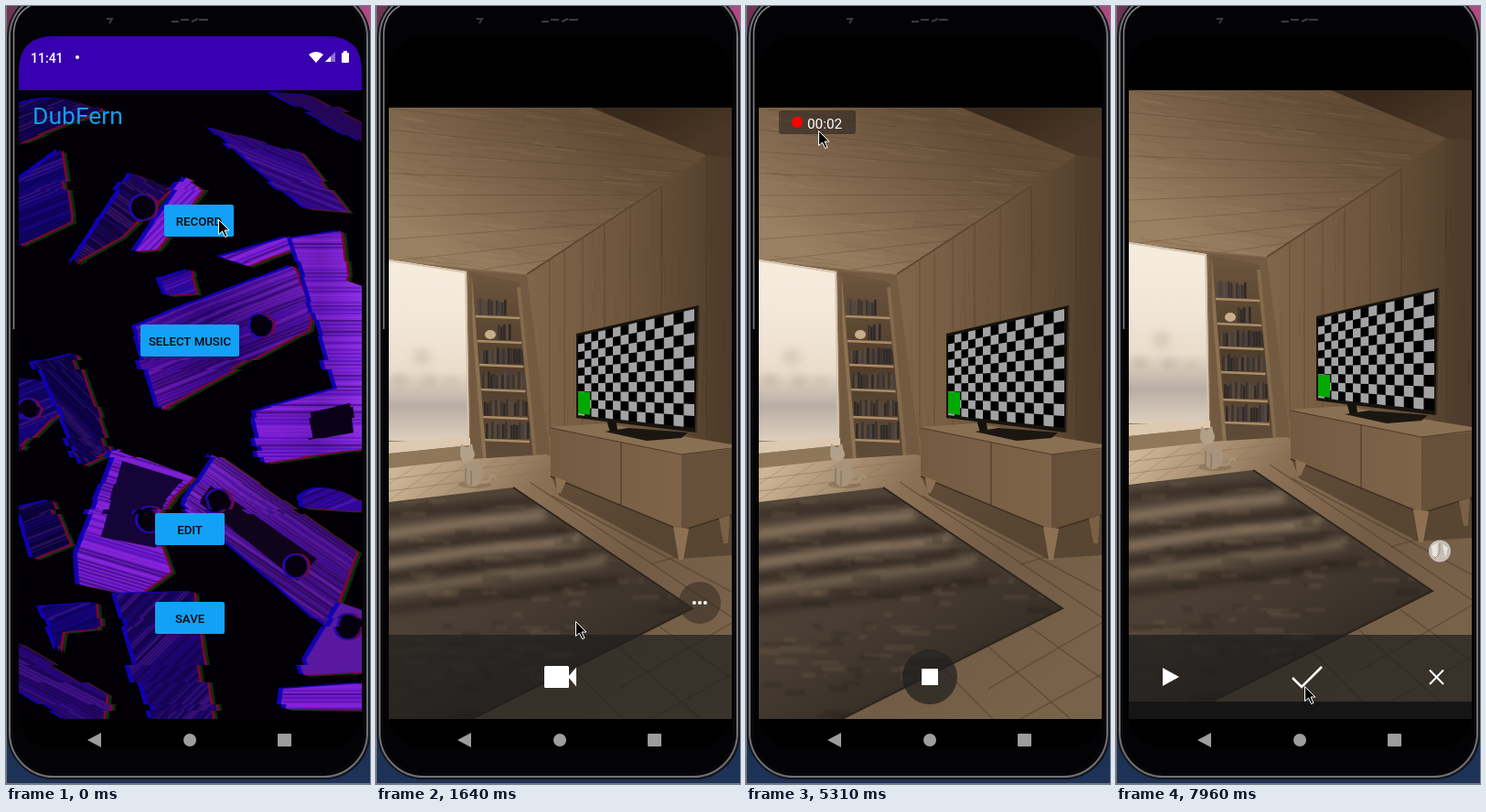
These frames come from a looping animation (398x850 px, 8000 ms). An HTML page with a canvas:

```html
<!DOCTYPE html>
<html lang="en">
<head>
<meta charset="utf-8">
<style>
html, body { margin: 0; width: 100%; height: 100%; overflow: hidden; background: #000; }
canvas { display: block; }
</style>
</head>
<body>
<canvas id="stage" width="398" height="850"></canvas>
<script>
const W = 398, H = 850, LOOP = 8000, TICK = 136;
const stage = document.getElementById('stage').getContext('2d');
let g = stage;

let seed = 7;
const rand = () => (seed = seed * 16807 % 2147483647) / 2147483647;
const lerp = (a, b, k) => a + (b - a) * k;
const clamp = (v, lo = 0, hi = 1) => Math.min(hi, Math.max(lo, v));

function fill(path, color) { g.fillStyle = color; g.fill(new Path2D(path)); }
function stroke(path, color, width = 1) {
  g.strokeStyle = color; g.lineWidth = width; g.stroke(new Path2D(path));
}
function box(x, y, w, h, color, r = 0) {
  g.fillStyle = color; g.beginPath(); g.roundRect(x, y, w, h, r); g.fill();
}
function oval(x, y, rx, color, ry = rx) {
  g.fillStyle = color; g.beginPath(); g.ellipse(x, y, rx, ry, 0, 0, 7); g.fill();
}
function text(s, x, y, size, color, weight = 400, align = 'left') {
  g.font = `${weight} ${size}px Roboto, sans-serif`;
  g.textAlign = align; g.fillStyle = color; g.fillText(s, x, y);
}
function gradient(x0, y0, x1, y1, ...colors) {
  const gr = g.createLinearGradient(x0, y0, x1, y1);
  colors.forEach((c, i) => gr.addColorStop(i / (colors.length - 1), c));
  return gr;
}
function clipped(path, draw) { g.save(); g.clip(new Path2D(path)); draw(); g.restore(); }
function layer(draw) {
  const c = document.createElement('canvas');
  c.width = W; c.height = H;
  const outer = g;
  g = c.getContext('2d'); draw(); g = outer;
  return c;
}

const phone = layer(() => {
  box(0, 0, W, 400, gradient(0, 0, W, 0, '#6e3555', '#4a2748', '#b34a83'));
  box(0, 400, W, 450, gradient(0, 400, 0, H, '#241a34', '#1d3358'));
  box(0, 0, 1, H, '#77787d'); box(0, H - 1, W, 1, '#77787d');
  box(2, -16, 396, 861, '#030305', 50);
  const rim = (inset, color, width) => {
    g.beginPath(); g.roundRect(2 + inset, -16 + inset, 395 - 2 * inset, 860 - 2 * inset, 50 - inset);
    g.strokeStyle = color; g.lineWidth = width; g.stroke();
  };
  rim(0, '#18191c', 2); rim(2, '#717378', 2); rim(5, '#08080b', 2);
  stroke('M8.5 353V28Q10 8 26 0', '#85878c', 1.5);
  box(14, 33, 375, 778, '#000', 38);
  stroke('M110 14h6l-3 5M181 17h8M191 15h9M203 17l7-3M211 15h10', '#3b3b3f', 2);
});

// One cassette body: colour fringes, shaded face, then fine stripes along its edge.
function cassette(path, color, slope = -0.4) {
  for (const [dx, dy, fringe] of [[-5, -1, '#1000b4'], [6, 2, '#06300c'], [3, 1, '#7c0630']]) {
    g.save(); g.translate(dx, dy); fill(path, fringe); g.restore();
  }
  fill(path, color);
  clipped(path, () => {
    for (let y = 0; y < 1000; y += 4)
      stroke(`M0 ${y}L398 ${y + 398 * slope}`, ['#0e004070', '#2a04a060', '#b040ff30'][rand() * 3 | 0], 1 + rand() * 2);
  });
}
// Shifts a few horizontal bands of what is drawn so far sideways.
function glitch() {
  for (let y = 110; y < 770; y += 14 + rand() * 40) {
    const h = 4 + rand() * 16, shift = rand() * 18 - 9;
    g.drawImage(g.canvas, 14, y, 375, h, 14 + shift, y, 375, h);
  }
}
const BUTTONS = [['RECORD', 173, 217, 76], ['SELECT MUSIC', 147, 348, 108], ['EDIT', 163, 554, 76], ['SAVE', 163, 651, 76]];

const home = layer(() => clipped('M14 71Q14 33 52 33H351Q389 33 389 71V779H14Z', () => {
  box(14, 33, 375, 746, '#020006');
  const dim = '#100468', mid = '#32089a', hot = '#7a1ed0';
  g.filter = 'blur(.7px)';
  cassette('M14 190L60 157 72 235 14 262Z', dim);
  cassette('M14 108Q55 92 96 112L90 120 14 150Z', '#0a033c');
  cassette('M72 282L138 183 182 198 126 252Z', '#14063c', .7);
  cassette('M290 95L330 97 389 128V148Z', '#240658', .4);
  cassette('M228 133L322 160 374 225 328 221 268 172Z', '#320a80', .4);
  cassette('M197 187L216 199 165 266 141 268Z', hot, -1);
  cassette('M235 274L310 252 312 266 262 284Z', hot);
  cassette('M168 298L200 288 208 314 176 316Z', mid);
  cassette('M140 350L312 284 334 330 328 354 168 441Z', gradient(140, 430, 330, 290, '#6214a8', '#34087a', '#6a1cb4'));
  cassette('M312 254L366 246 372 300 389 306V484L283 499 270 443 362 418 330 310Z', gradient(300, 0, 389, 0, hot, '#6a1ab8', '#8a2ce0'), 0);
  fill('M330 444L376 434 380 466 336 474Z', '#0a0018');
  cassette('M14 407L44 410 60 440 14 486Z', dim);
  cassette('M36 390L76 380 114 488 84 502Z', '#0b0340', 1);
  cassette('M122 484L205 515 176 545 168 585 180 618 142 645 80 632 78 598 108 522Z', hot, .3);
  fill('M127 497L194 518 172 545 164 592 104 580Z', '#150438');
  cassette('M231 490L383 596 352 681 195 545Z', gradient(200, 500, 370, 680, '#7a24c4', '#4c1488', '#4a1284'), .68);
  fill('M226 524L340 604 318 628 212 543Z', '#10041c');
  cassette('M325 536Q350 515 389 542V552L325 548Z', mid);
  cassette('M14 548L50 540 70 588 30 604Z', '#0a0338');
  cassette('M328 714L366 652 389 660V728L334 731Z', '#5a18a0', -1);
  cassette('M38 656L98 652 100 680 62 684 58 706Z', dim);
  cassette('M14 696L110 752 106 779H64L14 748Z', '#260868', .5);
  cassette('M120 642L205 640 226 779H160Z', '#1a065a', -1);
  cassette('M303 746L389 740V769L300 768Z', hot, 0);
  for (const [x, y, r] of [[277, 349, 14], [157, 561, 15], [234, 541, 14], [317, 612, 14], [150, 220, 15], [374, 678, 15], [24, 440, 12]]) {
    oval(x + 2, y, r, '#70083a'); oval(x - 1, y, r, '#2408a8'); oval(x, y, r - 2, '#05000d');
  }
  g.filter = 'none';
  glitch();

  box(14, 33, 375, 59, '#3900b1');
  text('11:41', 27, 62, 14, '#fff', 500);
  oval(78, 56, 2, '#fff');
  fill('M331 53Q339 47 347 53L339 62Z', '#fff');
  fill('M349 61L360 50V61Z', '#8f70d4'); fill('M349 61L355 55V61Z', '#fff');
  box(367, 51, 8, 11, '#fff', 1); box(369, 49, 4, 3, '#fff');
  text('DubFern', 29, 129, 26.5, '#189bea');
  for (const [label, x, y, w] of BUTTONS) {
    box(x, y + 1, w, 35, '#0006', 2);
    box(x, y, w, 35, '#12a1f6', 2);
    text(label, x + w / 2, y + 22.5, 13.2, '#05080c', 500, 'center');
  }
}));

function television() {
  fill('M252 452L262 450 264 463 256 466Z', '#15120e');
  fill('M250 465L276 461 341 466 334 472 296 475Z', '#1b1611');
  fill('M219 358L353 327 350 466 219 450Z', '#17130e');
  stroke('M353 328L350 466', '#3c3022', 2);
  const spot = (u, v) => {
    const k = u / (u + (1 - u) * 1.3);
    return [lerp(221, 348, k), lerp(lerp(361, 331, k), lerp(447, 461, k), v)];
  };
  const patch = (u, v, du, dv, color) =>
    fill('M' + [spot(u, v), spot(u + du, v), spot(u + du, v + dv), spot(u, v + dv)].join('L') + 'Z', color);
  patch(0, 0, 1, 1, '#020202');
  for (let c = 0; c < 14; c++)
    for (let r = (c + 1) % 2; r < 10; r += 2) patch(c / 14, r / 10, 1 / 14, .1, '#a3a3a5');
  fill('M221 422H234V447L221 445Z', '#00a800');
}

function shelf() {
  fill('M101 289L165 294 190 490 104 499Z', '#735b42');
  fill('M103 291L157 302 175 493 118 497Z', gradient(0, 292, 0, 495, '#6d553d', '#503e2c', '#5f4b37'));
  [340, 367, 393, 420, 450, 475].forEach((y, i) => {
    const left = 109 + i * 2, right = 157 + i * 2.2;
    for (let x = left + 1; x < right - 14 * (i < 2); x += 3) {
      if (i === 1 && x < 132) continue;
      const h = 14 + rand() * 5;
      box(x, y - 2 - h, 2.6, h, ['#3c3430', '#2f2a28', '#57483c', '#484040'][rand() * 4 | 0]);
    }
    stroke(`M${left} ${y - 1}L${right} ${y + 1}`, '#a98c68', 2.5);
  });
  oval(125, 359, 6, '#c5ad8e', 5);
  stroke('M103 296L119 497', '#8c7151', 4);
  stroke('M156 307L174 495', '#846a4b', 4);
}

function rug() {
  const shape = 'M14 542L150 526 346 658 105 779H14Z';
  fill(shape, gradient(60, 530, 190, 760, '#54473a', '#4a3f34', '#352d26'));
  clipped(shape, () => {
    g.filter = 'blur(4px)';
    stroke('M10 578L90 566 185 556M10 610L110 594 225 584', '#a58f74a0', 11);
    stroke('M10 640L120 624 250 606', '#8f7a62a0', 9);
    stroke('M10 556L175 540M10 594L210 571M10 625L230 598M10 660L270 626', '#2a221bb0', 9);
    g.filter = 'blur(1px)';
    for (let i = 0; i < 150; i++) {
      const y = 535 + rand() * 240;
      box(14 + rand() * 320, y, 8 + rand() * 26, 3 + rand() * 5, rand() < .5 ? '#1c161230' : '#9a836624');
    }
    g.filter = 'none';
  });
  stroke('M150 526L346 658 105 779', '#2b241e', 2);
}

const room = layer(() => clipped('M14 111H389V779H14Z', () => {
  box(14, 111, 375, 668, gradient(165, 0, 389, 0, '#80664a', '#6d553d', '#4f3c2a'));
  for (const [x, y] of [[190, 276], [206, 266], [226, 253], [250, 238], [278, 220], [312, 197], [361, 163]])
    stroke(`M${x} ${y}V470`, '#4c392770', x > 300 ? 1.5 : 1);
  for (let i = 0; i < 90; i++) {
    const y = 210 + rand() * 260;
    box(165 + rand() * 224, y, 1, 20 + rand() * 50, '#3b2a1c14');
  }
  const ceiling = 'M14 111H235L361 163 312 197 165 293 14 278Z';
  fill(ceiling, gradient(210, 111, 90, 285, '#624c36', '#7c634a', '#9a8163'));
  clipped(ceiling, () => {
    for (let i = -4; i < 9; i++) stroke(`M14 ${111 + i * 24}L350 ${158 + i * 12}`, '#49372548');
    for (let i = 0; i < 110; i++) {
      const x = 14 + rand() * 290, y = 111 + rand() * 180;
      stroke(`M${x} ${y}l${20 + rand() * 40} 5`, rand() < .5 ? '#4a372414' : '#c0a37f16', 2);
    }
  });
  fill('M235 111H389V166L361 163Z', gradient(300, 111, 330, 163, '#38291c', '#493624'));
  fill('M361 163L389 150V480H361Z', '#49372540');
  stroke('M165 293L312 197', '#5a442f', 1.5);

  shelf();
  fill('M14 277L99 290 102 475H14Z', gradient(0, 285, 0, 475, '#f5ecde', '#f4e9da', '#f0e4d4', '#e9dccb', '#b9aea4', '#dccfbe'));
  g.filter = 'blur(4px)';
  oval(50, 384, 10, '#d9ccbb'); oval(26, 410, 10, '#cbbdac', 7); oval(58, 411, 9, '#cbbdac', 7); oval(82, 413, 9, '#cfc1b0', 6);
  g.filter = 'none';
  stroke('M14 278L98 291 101 475', '#d6c5ae', 2);
  stroke('M103 291L106 475', '#73593f', 3);
  fill('M14 476L103 472V480L14 489Z', '#dcc9af');
  fill('M14 489L103 480 104 495 14 505Z', '#8f7759');

  fill('M14 505L104 495 186 490 389 560V779H14Z', gradient(30, 500, 330, 740, '#cdb596', '#8b7155', '#735c45', '#79624a'));
  for (let i = 0; i < 7; i++) stroke(`M${14 + i * 30} ${505 - i * 2.5}l-60 40`, '#8a705466');
  stroke('M14 517L180 497M14 530L215 505', '#8a705488');
  stroke('M192 535L389 640M168 520L389 668M310 678L389 735M265 700L355 779M215 724L270 779', '#4d3c2a90', 1.5);
  stroke('M389 674L265 746M389 730L300 779M300 610L335 600', '#4d3c2a80', 1.5);
  fill('M192 514L333 573 389 556V600L330 604 200 535Z', '#43332390');
  rug();

  fill('M191 460L250 456 389 479V488L333 491Z', '#8a7053');
  fill('M191 461L334 490V573L191 514Z', gradient(191, 0, 334, 0, '#735b42', '#7d6449'));
  fill('M334 490L389 484V556L334 573Z', '#665039');
  stroke('M191 461L334 490 389 483M268 476V545', '#4d3b2a', 1.2);
  stroke('M191 514L334 573 389 556', '#3f2f20', 1.5);
  fill('M196 514L208 519 202 532H198Z', '#8b7051');
  fill('M325 569L342 571 336 605H331Z', '#8d7152');
  fill('M375 560L387 556 385 587H380Z', '#7a6045');
  television();

  oval(108, 523, 18, '#6d573f60', 4);
  stroke('M112 520Q124 522 125 516T131 516', '#a59078', 3);
  oval(106, 511, 11, '#a8947c', 14);
  oval(100, 490, 8, '#b3a08a', 8);
  fill('M92 488L93 478 99 483 105 478 107 489Z', '#b3a08a');
  stroke('M98 505V524M104 508V524', '#8b7862', 1.5);
}));

function scene(dy) { g.drawImage(room, 0, dy); }

function videoIcon(x, y, s, color) {
  box(x, y, 27 * s, 24 * s, color, 1.5 * s);
  fill(`M${x + 26 * s} ${y + 12 * s}L${x + 35 * s} ${y + 1.5 * s}V${y + 22.5 * s}Z`, color);
}

const SHADE = 'rgba(30,30,30,.7)', RED = 'rgba(165,42,42,.48)';

function splash(shift, top) {
  clipped(`M14 ${top}H389V811H14Z`, () => {
    box(14, 33 + shift, 375, 780, '#000', 38);
    box(14, 93 + shift, 375, 686 - shift, '#1e1e1e');
    videoIcon(178, 421 + shift, 1.32, '#6f7074');
  });
}

function opening(t) {
  if (t < 520) g.drawImage(home, 0, 0);
  else if (t < 640) clipped('M14 71Q14 33 52 33H351Q389 33 389 71Z', () => box(14, 33, 375, 20, '#3900b1'));
  if (t >= 120) splash(t < 240 ? 20 : t < 520 ? 7 : t < 640 ? 4 : 0, t < 240 ? 480 : 33);
}

function controlBar(t, q) {
  const idle = t < 2440;
  const radius = t < 2580 ? 260 : lerp(200, 30, clamp((t - 2580) / 420));
  g.save();
  g.beginPath(); g.rect(14, 687, 375, 92); g.clip();
  g.beginPath(); g.arc(201, 733, radius, 0, 7); g.clip();
  box(14, 687, 375, 92, SHADE);
  if (t >= 2170 && t < 2860) oval(201, 733, lerp(30, 260, clamp((q - 2100) / 340)), RED);
  if (t >= 6850) oval(201, 733, t < 6980 ? 20 : 30, RED);
  g.restore();
  if (idle) {
    videoIcon(184, 721, 1, '#fff');
    oval(354, 652, 23, 'rgba(50,40,34,.55)');
    for (const x of [348, 354, 360]) oval(x, 652, 2, '#fff');
  } else box(192, 724, 18, 18, '#fff');
}

function timer(t) {
  const seconds = [3730, 4710, 5610, 6570].filter(at => t >= at).length;
  box(36, 114, 84, 26, 'rgba(50,40,34,.65)', 3);
  oval(56, 127, 6, '#f00');
  text('00:0' + seconds, 67, 133.5, 15.3, '#fff');
}

function review(t) {
  if (t < 7820) box(14, 111, 375, 668, '#000');
  else scene(-19);
  box(14, 687, 375, 92, SHADE);
  if (t >= 7820) {
    oval(354, 595.5, 12, '#c5beb4');
    fill('M345 590L352 586 351 603 346 600ZM357 588L363 592 360 603Z', '#e8e4dc');
    stroke('M354 587V598L348 604', '#9b9286');
  }
  fill('M51 723L69 733 51 743Z', '#fff');
  stroke('M193 734L203 744 225 722', '#fff', 2.6);
  stroke('M343 725.5L358 741M358 725.5L343 741', '#fff', 2);
}

const PATH = [
  [1224, 232, 233], [1632, 218, 672], [1768, 206, 724], [2312, 206, 726], [2992, 216, 711],
  [4352, 216, 711], [4760, 140, 420], [5168, 52, 138], [5304, 79, 136], [5440, 90, 136],
  [5576, 92, 140], [5984, 150, 480], [6256, 206, 788], [6528, 206, 743]
];
function cursor(q) {
  const i = PATH.findIndex(p => p[0] > q);
  let [, x, y] = PATH.at(i < 0 ? -1 : Math.max(0, i - 1));
  if (i > 0) {
    const [t0] = PATH[i - 1], [t1, x1, y1] = PATH[i], k = (q - t0) / (t1 - t0);
    x = lerp(x, x1, k); y = lerp(y, y1, k);
  }
  g.save(); g.translate(Math.round(x) + .5, Math.round(y) + .5);
  const arrow = 'M0 0V16L4 12.5 7 19 9.5 18 6.5 11.5H11.5Z';
  fill(arrow, '#000'); stroke(arrow, '#fff');
  g.restore();
}

function render(t) {
  const q = Math.floor(t / TICK) * TICK;
  g.drawImage(phone, 0, 0);
  if (t < 770) opening(t);
  else if (t < 7530) {
    scene(0);
    controlBar(t, q);
    if (t >= 2720) timer(t);
  } else review(t);
  fill('M89 802L104 794V810Z', '#9d9d9d');
  oval(201, 802, 7, '#9d9d9d');
  box(297, 795, 15, 14, '#9d9d9d', 1);
  cursor(q);
}

function loop() {
  render(performance.now() % LOOP);
  requestAnimationFrame(loop);
}
loop();
</script>
</body>
</html>
```
